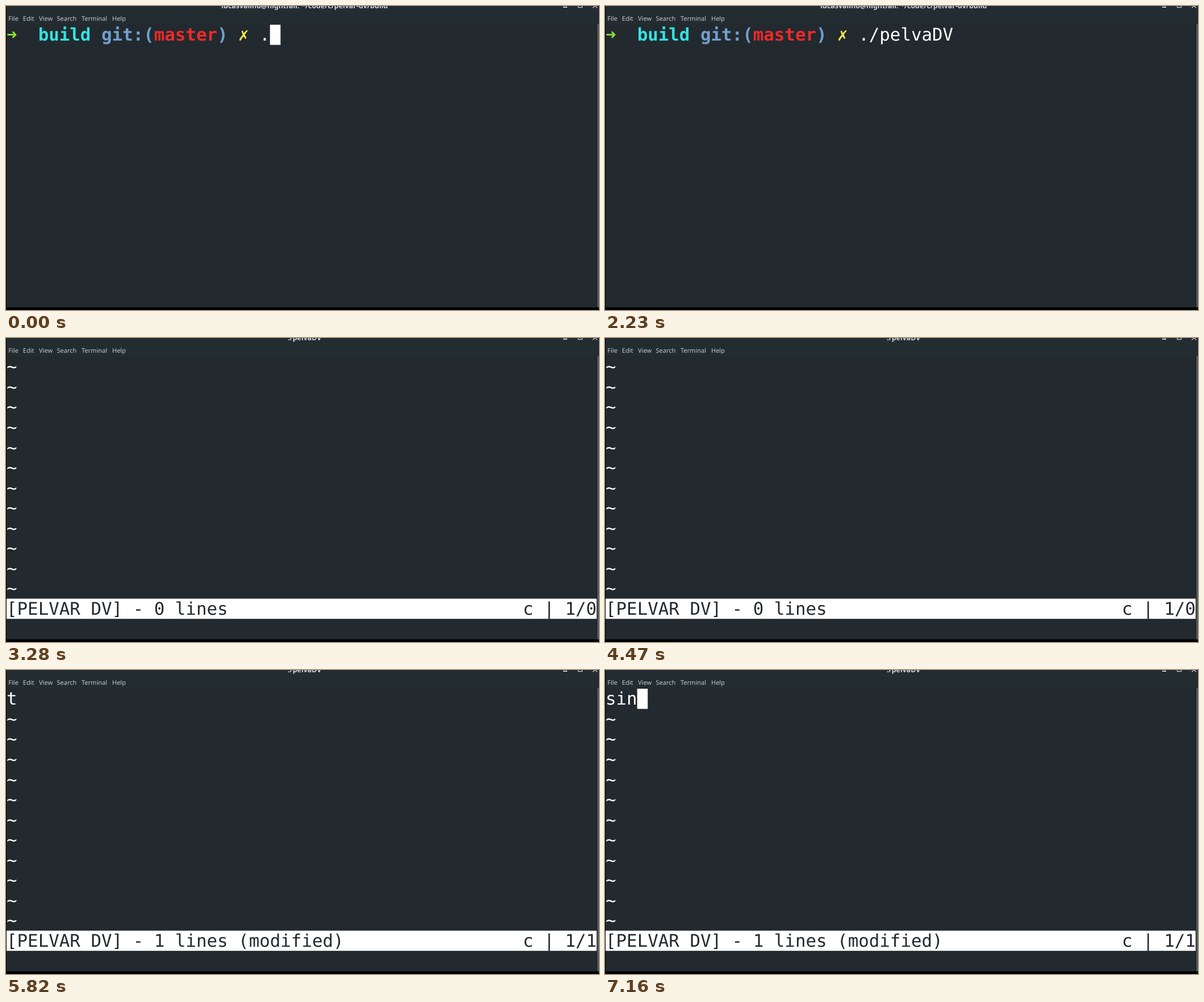
Animation, 1044 px wide and 536 px high, one loop 8 s. Source, as an HTML page with a canvas:

```html
<!DOCTYPE html>
<html lang="en">
<head>
<meta charset="utf-8">
<style>
  html, body { margin: 0; width: 100%; height: 100%; overflow: hidden; background: #000; }
  canvas { display: block; }
</style>
</head>
<body>
<canvas id="stage" width="1044" height="536"></canvas>
<script>
const ctx = document.getElementById('stage').getContext('2d');
const LOOP = 8000, COLS = 56, LEFT = 1, TOP = 33;
const CELL_W = 18.55, CELL_H = 35.55, BASELINE = 28.3;
const MONO = '30.81px "DejaVu Sans Mono", monospace';
const BG = '#222a2f', WHITE = '#fff', CHROME = '#c3cacc';
const COMMAND = './pelvaDV ';

// [start ms, screen, typed text, cursor column or -1 while hidden]
const steps = [
  [0, 'shell', 1, 25],
  [300, 'shell', 2, 26],
  [900, 'shell', 2, -1],
  [1350, 'shell', 3, 27],
  [1490, 'shell', 4, 28],
  [1790, 'shell', 10, 34],
  [2230, 'shell', 10, -1],
  [2680, 'empty', '~', 0],
  [3280, 'empty', '~', -1],
  [3870, 'empty', '~', 0],
  [4470, 'empty', '~', -1],
  [5070, 'empty', '~', 0],
  [5220, 'edited', 't', 1],
  [5820, 'edited', 't', -1],
  [6420, 'edited', '', 0],
  [6870, 'edited', 's', 1],
  [7010, 'edited', 'si', 2],
  [7160, 'edited', 'sin', 3]
];

function rect(x, y, w, h, color) {
  ctx.fillStyle = color;
  ctx.fillRect(x, y, w, h);
}

function label(text, x, y, font, color, align = 'left') {
  ctx.font = font;
  ctx.fillStyle = color;
  ctx.textAlign = align;
  ctx.fillText(text, x, y);
}

// Writes text on the terminal's character grid.
function put(text, col, row, color = WHITE, weight = '') {
  [...text].forEach((ch, i) =>
    label(ch, LEFT + (col + i) * CELL_W, TOP + row * CELL_H + BASELINE, weight + MONO, color));
}

function drawWindow(title) {
  rect(0, 0, 1044, 536, '#000');
  rect(1, 0, 1043, 531.3, BG);
  rect(1, 0, 1043, 32, '#232c31');
  rect(1040, 32, 1, 499.3, '#1b2226');
  rect(1041, 32, 3, 499.3, '#535a5d');

  label(title, 525.7, 3.5, 'bold 12.4px "Noto Sans", sans-serif', '#d3dadc', 'center');
  const menu = { File: 4.3, Edit: 29.8, View: 58, Search: 89.5, Terminal: 133, Help: 187 };
  for (const name in menu) label(name, menu[name], 26, '11px "Noto Sans", sans-serif', CHROME);

  rect(981, 1, 7, 2, CHROME);
  ctx.strokeStyle = CHROME;
  ctx.lineWidth = 1.3;
  ctx.strokeRect(1007.5, -4.5, 7, 7);
  ctx.beginPath();
  ctx.moveTo(1033, 3.5);
  ctx.lineTo(1041, -4.5);
  ctx.moveTo(1041, 3.5);
  ctx.lineTo(1033, -4.5);
  ctx.stroke();
}

function drawShell(typed) {
  put('➜', 0, 0, '#8ae234', 'bold ');
  put('build', 3, 0, '#34e2e2', 'bold ');
  put('git:(', 9, 0, '#729fcf', 'bold ');
  put('master', 14, 0, '#ef2929', 'bold ');
  put(')', 20, 0, '#729fcf', 'bold ');
  put('✗', 22, 0, '#fce94f', 'bold ');
  put(COMMAND.slice(0, typed), 24, 0);
}

function drawEditor(text, lines) {
  put(text, 0, 0);
  for (let row = 1; row < 12; row++) put('~', 0, row);
  rect(LEFT, TOP + 12 * CELL_H, COLS * CELL_W, CELL_H, WHITE);
  put(`[PELVAR DV] - ${lines} lines${lines ? ' (modified)' : ''}`, 0, 12, BG);
  put(`c | 1/${lines}`, COLS - 7, 12, BG);
}

function drawCursor(col, under) {
  rect(LEFT + col * CELL_W, TOP, CELL_W, CELL_H, WHITE);
  put(under, col, 0, BG);
}

function frame(now) {
  const t = now % LOOP;
  const [, screen, text, cursor] = steps.findLast(step => step[0] <= t);
  const shell = screen === 'shell';
  drawWindow(shell ? 'lucasvalino@nightfall: ~/code/c/pelvar-dv/build' : COMMAND.trim());
  if (shell) drawShell(text);
  else drawEditor(text, screen === 'edited' ? 1 : 0);
  if (cursor >= 0) drawCursor(cursor, screen === 'empty' ? '~' : '');
}

ctx.textRendering = 'geometricPrecision';
const start = performance.now();
function tick() {
  frame(performance.now() - start);
  requestAnimationFrame(tick);
}
tick();
</script>
</body>
</html>
```
